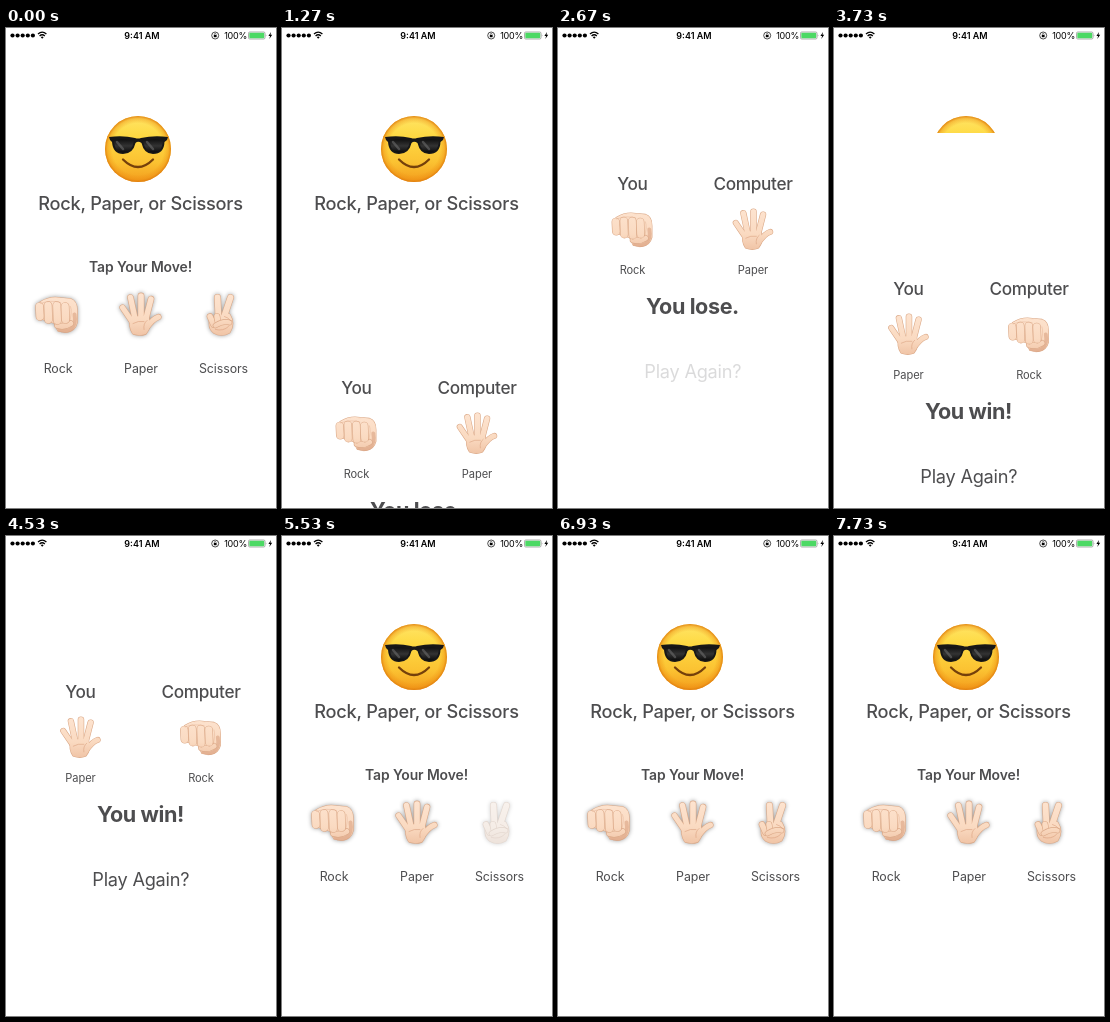
These frames come from a looping animation (270x480 px, 8070 ms). An HTML page:

```html
<!DOCTYPE html>
<html lang="en">
<head>
<meta charset="utf-8">
<title>Rock, Paper, or Scissors</title>
<style>
  html, body { margin: 0; width: 100%; height: 100%; overflow: hidden; background: #fff; }
  svg { display: block; width: 100%; height: 100%; }
  text { font-family: Inter, "Open Sans", sans-serif; fill: #4d4d4f; text-anchor: middle; }
  .edge { fill: #dba988; stroke: #dba988; }
  .skin { fill: url(#tone); stroke: url(#tone); }
  .edge, .skin { stroke-linecap: round; stroke-linejoin: round; }
  .shade { fill: none; stroke: #d79c7b; stroke-linecap: round; }
  .button { filter: drop-shadow(0 0 2px rgba(0, 0, 0, .38)); }
  .status text { fill: #000; }
</style>
</head>
<body>
<svg id="stage" viewBox="0 0 270 480"></svg>
<script>
const LOOP = 8070, FRAME = 1000 / 15, HEIGHT = 480;

const ROUNDS = [
  { press: 1000, show: 1161, again: 2660, hide: 2785, you: 'Rock', computer: 'Paper', result: 'You lose.' },
  { press: 3460, show: 3576, again: 4730, hide: 4855, you: 'Paper', computer: 'Rock', result: 'You win!' },
  { press: 5530, show: 5597, again: 6660, hide: 6790, you: 'Scissors', computer: 'Rock', result: 'You lose.' }
];

const text = (x, y, size, weight, label, spacing = 0) =>
  `<text x="${x}" y="${y}" font-size="${size}" font-weight="${weight}" letter-spacing="${spacing}">${label}</text>`;

// Each part is [path, stroke width]; a wider pass underneath makes the outline.
const merged = parts => ['edge', 'skin'].map((kind, i) => parts.map(([d, width]) =>
  `<path class="${kind}" d="${d}" stroke-width="${width + (i ? -.6 : .6)}"/>`).join('')).join('');
const limb = (d, width) => merged([[d, width]]);
const shade = (d, width = .8, opacity = .7) =>
  `<path class="shade" d="${d}" stroke-width="${width}" opacity="${opacity}"/>`;

const HANDS = {
  Rock:
    merged([['M-16 -12Q-6 -18 4 -16L14 -15Q20 -13 20 -4L20 8Q18 16 10 17L2 16L-2 8L-14 4Z', 2]]) +
    shade('M18 0Q20 10 14 15Q8 18 3 15', 4, .55) +
    limb('M14 9Q8 13 1 11', 6) +
    [[-17, -8, 2], [-8.5, -9, 5], [.3, -9, 6], [8.6, -8, 5]].map(([x, top, end]) =>
      limb(`M${x} ${top}L${x + .5} ${end}`, 8)).join('') +
    shade('M-16 -11Q-6 -15 4 -12M14 -8Q16 -2 13 7', .8, .4),
  Paper:
    merged([
      ['M-17.5 -7L-8 7', 5.6], ['M-9.5 -17L-5 4', 6], ['M1 -18.500L1 3', 6.2],
      ['M11 -15.500L6 4', 6], ['M18.500 2.500Q13 4 6 14', 5.6],
      ['M-8 4L7 3Q10 12 5 18Q0 20 -6 18Q-10 12 -8 4Z', 4]
    ]) + shade('M7 6Q3 9 4 15M-7 9Q-2 6 4 7'),
  Scissors:
    merged([
      ['M-3 -17L-2 4', 6.4], ['M10 -17L3 4', 6.4],
      ['M-9 5L8 1Q13 9 8 17Q1 21 -6 17Q-11 13 -9 5Z', 4]
    ]) +
    limb('M-10.500 2L-7 10', 6) + limb('M-3.500 2L-2.500 8', 6) +
    limb('M9 8Q3 6 -5 11', 5) + shade('M-5 15Q3 17 8 12M4 2Q8 3 10 6')
};

const hand = (name, x, y, scale) =>
  `<g transform="translate(${x} ${y}) scale(${scale})">${HANDS[name]}</g>`;

const defs = `
  <defs>
    <linearGradient id="tone" gradientUnits="userSpaceOnUse" x1="0" y1="-20" x2="0" y2="21">
      <stop offset="0" stop-color="#fde3cf"/><stop offset=".6" stop-color="#fadac1"/><stop offset="1" stop-color="#f0c4a6"/>
    </linearGradient>
    <linearGradient id="glow" x2="0" y2="1">
      <stop offset="0" stop-color="#ffe566"/><stop offset=".3" stop-color="#fed943"/>
      <stop offset=".7" stop-color="#fbc232"/><stop offset="1" stop-color="#f39c1c"/>
    </linearGradient>
    <radialGradient id="rim">
      <stop offset=".78" stop-color="#ec8a10" stop-opacity="0"/>
      <stop offset=".92" stop-color="#ec8a10" stop-opacity=".4"/><stop offset="1" stop-color="#dd7a0c" stop-opacity=".9"/>
    </radialGradient>
    <linearGradient id="lens" x2="0" y2="1">
      <stop offset="0" stop-color="#111"/><stop offset=".5" stop-color="#333"/><stop offset="1" stop-color="#0b0b0b"/>
    </linearGradient>
  </defs>`;

const face = `
  <circle cx="132" cy="121" r="33" fill="url(#glow)"/>
  <circle cx="132" cy="121" r="33" fill="url(#rim)"/>
  <path d="M117 131.500Q132 146.500 147 131.500" fill="none" stroke="#75400b" stroke-width="2.300" stroke-linecap="round"/>
  <path d="M103 109Q117 107 129 110Q132 111 135 110Q148 107 162 109L161 112L158.500 114Q158 126 147 126Q138 126 135.500 115Q132 112.500 129.500 115Q127 126 117 126Q107 126 106 114L104 112Z" fill="#171717"/>
  <path d="M108 112.500Q118 110 128 113Q126 124.500 117 124.500Q108.500 124.500 108 112.500ZM137 113Q147 110 157 112.500Q156 124.500 147.500 124.500Q139 124.500 137 113Z" fill="url(#lens)"/>
  <path d="M111 114L117 121M141 114L147 121" stroke="#777" stroke-width="2.500" stroke-linecap="round" opacity=".5"/>`;

const CHOICES = [['Rock', 50.5, 52], ['Paper', 134, 135], ['Scissors', 214.5, 217.5]];

const home = face +
  text(134.5, 182, 18.2, 500, 'Rock, Paper, or Scissors', -.25) +
  text(134.5, 243.5, 13.9, 600, 'Tap Your Move!', -.1) +
  CHOICES.map(([name, x, labelX]) =>
    `<g class="button" id="${name}">${hand(name, x, 286.5, 1)}</g>` +
    text(labelX, 345, 12.4, 400, name, -.1)).join('');

const round = ({ you, computer, result }) => `<g class="round">
  ${hand(you, you === 'Scissors' ? 71 : 74, 201.5, .96)}${hand(computer, 194.5, 201.5, .96)}
  ${text(74.5, 246, 11.1, 400, you, -.1)}${text(195, 246, 11.1, 400, computer, -.1)}
  ${text(134.5, 286, 21.6, 700, result, -.4)}</g>`;

const sheet = `<rect width="270" height="480" fill="#fff"/>
  ${text(74.5, 162, 17.2, 500, 'You', -.3)}${text(195, 162, 17.2, 500, 'Computer', -.3)}
  ${ROUNDS.map(round).join('')}
  <g id="again">${text(134.8, 350, 18.2, 400, 'Play Again?', -.25)}</g>`;

const status = `
  ${[0, 1, 2, 3, 4].map(i => `<circle cx="${6.5 + i * 5.1}" cy="7.5" r="2.1"/>`).join('')}
  <path d="M32 6Q36.200 2.200 40.400 6M33.600 7.900Q36.200 5.500 38.800 7.900" fill="none" stroke="#000" stroke-width="1.3"/>
  <path d="M34.800 9.200Q36.200 8 37.600 9.200L36.200 10.800Z"/>
  ${text(136, 10.7, 9, 600, '9:41 AM')}
  <circle cx="209.2" cy="7.5" r="3.5" fill="none" stroke="#000" stroke-width=".7"/>
  <path d="M207.800 7h2.800v2.200h-2.800z"/>
  <path d="M208.400 7V6.200a.8 .8 0 0 1 1.600 0V7" fill="none" stroke="#000" stroke-width=".5"/>
  ${text(229.7, 10.7, 9, 400, '100%', -.2)}
  <rect x="242.5" y="4" width="16.5" height="7" rx="1.3" fill="none" stroke="#777" stroke-width=".6"/>
  <rect x="243.3" y="4.8" width="14.9" height="5.4" rx=".7" fill="#4cd964"/>
  <path d="M259.800 6.300q1.200 1.200 0 2.400z" fill="#777"/>
  <path d="M265 4L262.400 8h1.700L263.300 11L266.200 6.800h-1.700z"/>`;

const stage = document.getElementById('stage');
stage.innerHTML = `${defs}${home}<g id="sheet">${sheet}</g><g class="status">${status}</g>`;
const byId = id => document.getElementById(id);
const roundViews = [...document.querySelectorAll('.round')];

// Critically damped spring: the share of the distance still to go.
function remaining(ms) {
  const u = Math.max(0, ms) * Math.sqrt(1000 / 3) / 1000;
  return (1 + u) * Math.exp(-u);
}

// 1 while held down, then fading out after release.
function held(t, down, up) {
  if (t < down) return 0;
  return Math.max(0, 1 - Math.max(0, t - up) / 250);
}

function render(t) {
  const index = Math.max(0, ROUNDS.findLastIndex(r => t >= r.press));
  const { press, show, again, hide, you } = ROUNDS[index];
  const offset = HEIGHT * (t < hide ? remaining(t - show) : 1 - remaining(t - hide));

  byId('sheet').setAttribute('transform', `translate(0 ${Math.round(offset)})`);
  roundViews.forEach((view, i) => view.style.display = i === index ? '' : 'none');
  byId('again').style.opacity = 1 - .8 * held(t, again, hide);

  for (const [name] of CHOICES) {
    const dim = name === you ? held(t, press, show) : 0;
    const button = byId(name);
    button.style.opacity = 1 - .5 * dim;
    button.style.filter = dim ? `grayscale(${.5 * dim}) drop-shadow(0 0 2px rgba(0, 0, 0, .38))` : '';
  }
}

function tick() {
  const t = performance.now() % LOOP;
  render(Math.floor((t + 4) / FRAME) * FRAME);
  requestAnimationFrame(tick);
}
tick();
</script>
</body>
</html>
```
